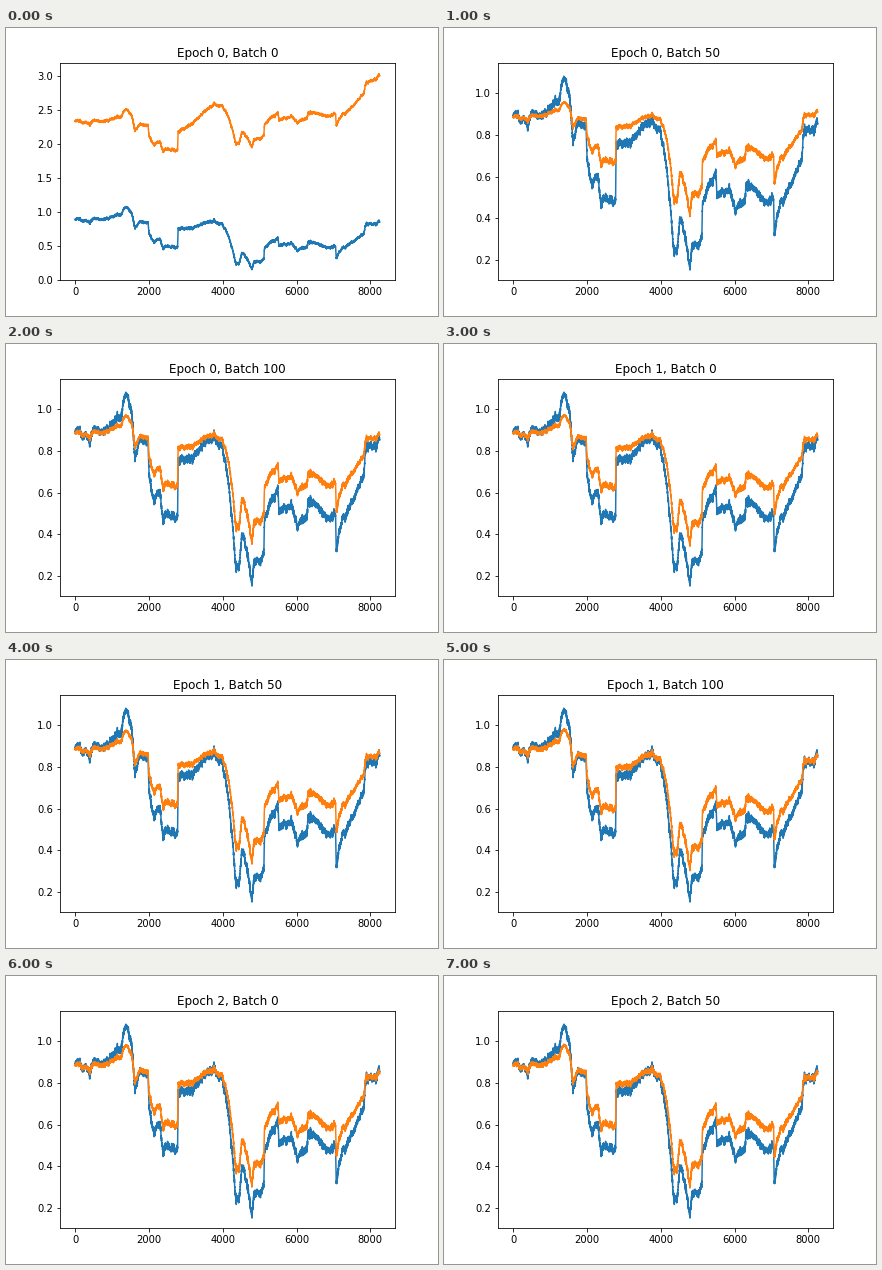
A matplotlib script for the animation above (8 s loop, 432 px wide and 288 px high).

```python
import numpy as np
import matplotlib.pyplot as plt
from matplotlib.animation import FuncAnimation

SAMPLES = 8251

# Turning points of the actual series: (sample, value)
TURNS = [
    (0, .89), (50, .915), (190, .86), (400, .855), (455, .91), (750, .89),
    (1080, .95), (1270, .965), (1300, 1.03), (1378, 1.09), (1540, .96),
    (1620, .75), (1755, .86), (1975, .85), (2000, .70), (2140, .56),
    (2300, .61), (2380, .45), (2460, .50), (2775, .48), (2790, .75),
    (3170, .77), (3735, .88), (4005, .79), (4170, .63), (4360, .22),
    (4440, .24), (4520, .40), (4630, .33), (4790, .165), (4850, .26),
    (5110, .29), (5130, .46), (5280, .55), (5490, .63), (5525, .49),
    (5850, .54), (6010, .44), (6280, .47), (6310, .58), (6580, .54),
    (6850, .47), (7060, .48), (7075, .31), (7150, .42), (7370, .50),
    (7830, .68), (7860, .80), (8150, .82), (8235, .88), (8250, .85),
]

# Level of the untrained prediction above the actual series: (time, offset)
OFFSETS = [(0, 1.45), (.34, 1.43), (.46, 1.73), (.9, 1.98), (1, 2.16)]

# How far training has come at each batch shown after the first
PROGRESS = [0, .5, .58, .66, .94, .96, 1]

index = np.arange(SAMPLES)
time = index / (SAMPLES - 1)


def through(points, x):
    return np.interp(x, *zip(*points))


def market_noise(seed, memory=.97, wander=.011, white=.005):
    """Mean-reverting random walk with fine jitter on top."""
    rng = np.random.default_rng(seed)
    drift = np.zeros(SAMPLES)
    for i, step in enumerate(rng.normal(0, 1, SAMPLES - 1), start=1):
        drift[i] = memory * drift[i - 1] + step
    drift *= wander * np.sqrt(1 - memory ** 2)
    return drift + rng.normal(0, white, SAMPLES)


actual = np.clip(through(TURNS, index) + market_noise(4), .15, 1.101)
untrained = np.minimum(actual + through(OFFSETS, time), 3.06)


def predict(step):
    if step == 0:
        return untrained
    # A curved response that overrates low values, and sinks with training
    early = .45 + .8 * (actual - .2) - .357 * (actual - .2) * (actual - .5)
    early += .04 * time - .02
    sink = .1 * (1 - actual ** 2) + .06 * time - .02
    return early - PROGRESS[step - 1] * sink


fig = plt.figure(figsize=(6, 4), dpi=72, facecolor="white")
ax = fig.add_axes([.125, .125, .775, .755])
ax.plot(index, actual, color="C0", lw=1.5)
predicted, = ax.plot(index, untrained, color="C1", lw=1.5)
margin = .05 * (SAMPLES - 1)
ax.set_xlim(-margin, SAMPLES - 1 + margin)


def update(step):
    epoch, part = divmod(step, 3)
    ax.set_title(f"Epoch {epoch}, Batch {50 * part}")
    predicted.set_ydata(predict(step))
    ax.set_ylim((-.001, 3.205) if step == 0 else (.1022, 1.1485))
    return predicted,


anim = FuncAnimation(fig, update, frames=len(PROGRESS) + 1, interval=1000,
                     repeat=True, repeat_delay=0, blit=False)
plt.show()
```
